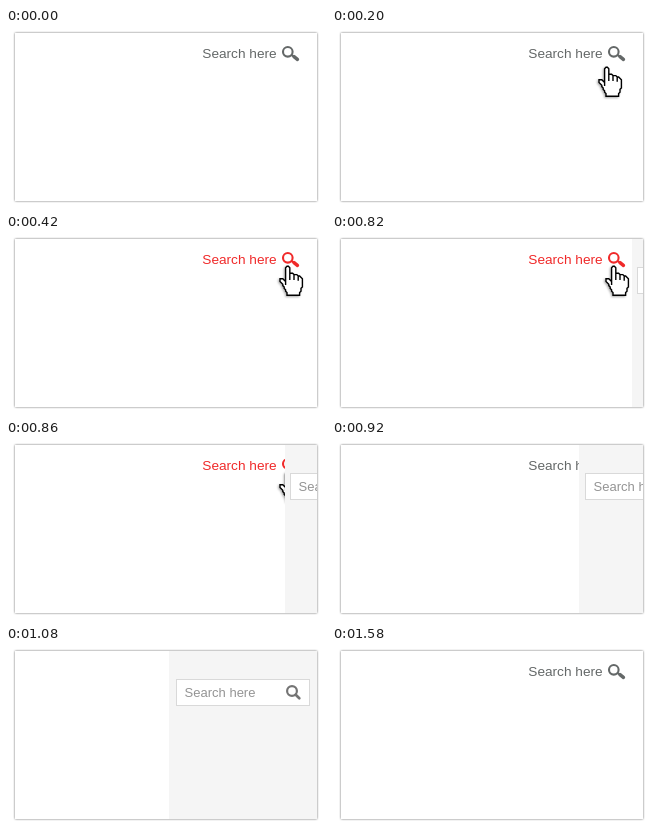
Write an HTML page that moves like this. It is 320 px wide and 178 px high and loops after 3160 ms.

```html
<!DOCTYPE html>
<html lang="en">
<head>
<meta charset="utf-8">
<title>Sliding search panel</title>
<style>
  html, body { margin: 0; height: 100%; overflow: hidden; background: #fff; }
  svg { display: block; width: 100vw; height: 100vh; }
  text { font-family: "Liberation Sans", Arial, sans-serif; }
  .card { fill: #fff; filter: drop-shadow(0 0 1.2px #0009); }
  .lens { fill: none; stroke: currentColor; }
  #link { color: #646868; }
  #link.hot { color: #f02a2a; }
  #link text { fill: currentColor; font-size: 13.65px; }
  #hand { filter: drop-shadow(-1px 1px 1px #0005); }
  #field { color: #747474; }
  #field text { fill: #949494; font-size: 13px; }
</style>
</head>
<body>
<svg viewBox="0 0 320 178">
  <clipPath id="inside"><rect x="9" y="5" width="302" height="168"/></clipPath>
  <rect class="card" x="9" y="5" width="302" height="168"/>

  <g id="link">
    <text x="196.3" y="30">Search here</text>
    <circle class="lens" cx="281.8" cy="23.8" r="4.8" stroke-width="2.1"/>
    <path class="lens" d="M285.5 27l2 1.4" stroke-width="2"/>
    <path class="lens" d="M288 28.6l3.4 2.8" stroke-width="3.5" stroke-linecap="round"/>
  </g>

  <g id="hand">
    <path transform="translate(273.3 31.6) scale(1.4 1.38)" fill="#fff" stroke="#000"
      d="M5.5 .5H6.5L7.5 1.5V5.5H9.5L10.5 6.5H12.5L13.5 7.5H14.5L16.5 9.5V15.5L15.5 16.5V18.5L14.5 19.5V21.5H5.5V19.5L4.5 18.5V17.5L3.5 16.5V15.5L2.5 14.5V13.5L.5 11.5V9.5H2.5L4.5 11.5V1.5Z
         M7.5 5.5V10.5M10.5 6.5V10.5M13.5 7.5V11M4.5 11V14"/>
  </g>

  <g clip-path="url(#inside)">
    <rect id="panel" y="5" width="160" height="168" fill="#f5f5f5"/>
    <g id="field">
      <rect x=".5" y="33.5" width="133" height="26" fill="#fff" stroke="#d9d9d9"/>
      <text x="8.6" y="51">Search here</text>
      <circle class="lens" cx="116" cy="45" r="4.9" stroke-width="2.2"/>
      <path class="lens" d="M119.7 48.7l3.6 3.5" stroke-width="2.7" stroke-linecap="round"/>
    </g>
  </g>
</svg>
<script>
  const LOOP = 3160, STEP = 20;
  const [link, hand, panel, field] =
    ["link", "hand", "panel", "field"].map(id => document.getElementById(id));

  const progress = (t, from, to) => Math.min(1, Math.max(0, (t - from) / (to - from)));
  const show = (el, on) => el.setAttribute("visibility", on ? "visible" : "hidden");
  const move = (el, x, y) => el.setAttribute("transform", `translate(${x} ${y})`);

  function draw(now) {
    const t = Math.floor(now % LOOP / STEP) * STEP;

    // The pointer glides diagonally onto the icon
    const away = Math.round(8.5 * (1 - progress(t, 160, 420)));
    move(hand, -away, away);
    show(hand, t >= 160 && t < 880);
    link.classList.toggle("hot", t >= 420 && t < 880);

    // The panel slides in from the right edge
    const slide = progress(t, 820, 1080), open = t >= 820 && t < 1580;
    move(panel, Math.round(300 - 137 * slide), 0);
    move(field, Math.round(305 - 135 * slide), 0);
    show(panel, open);
    show(field, open);

    requestAnimationFrame(draw);
  }
  draw(0);
</script>
</body>
</html>
```
